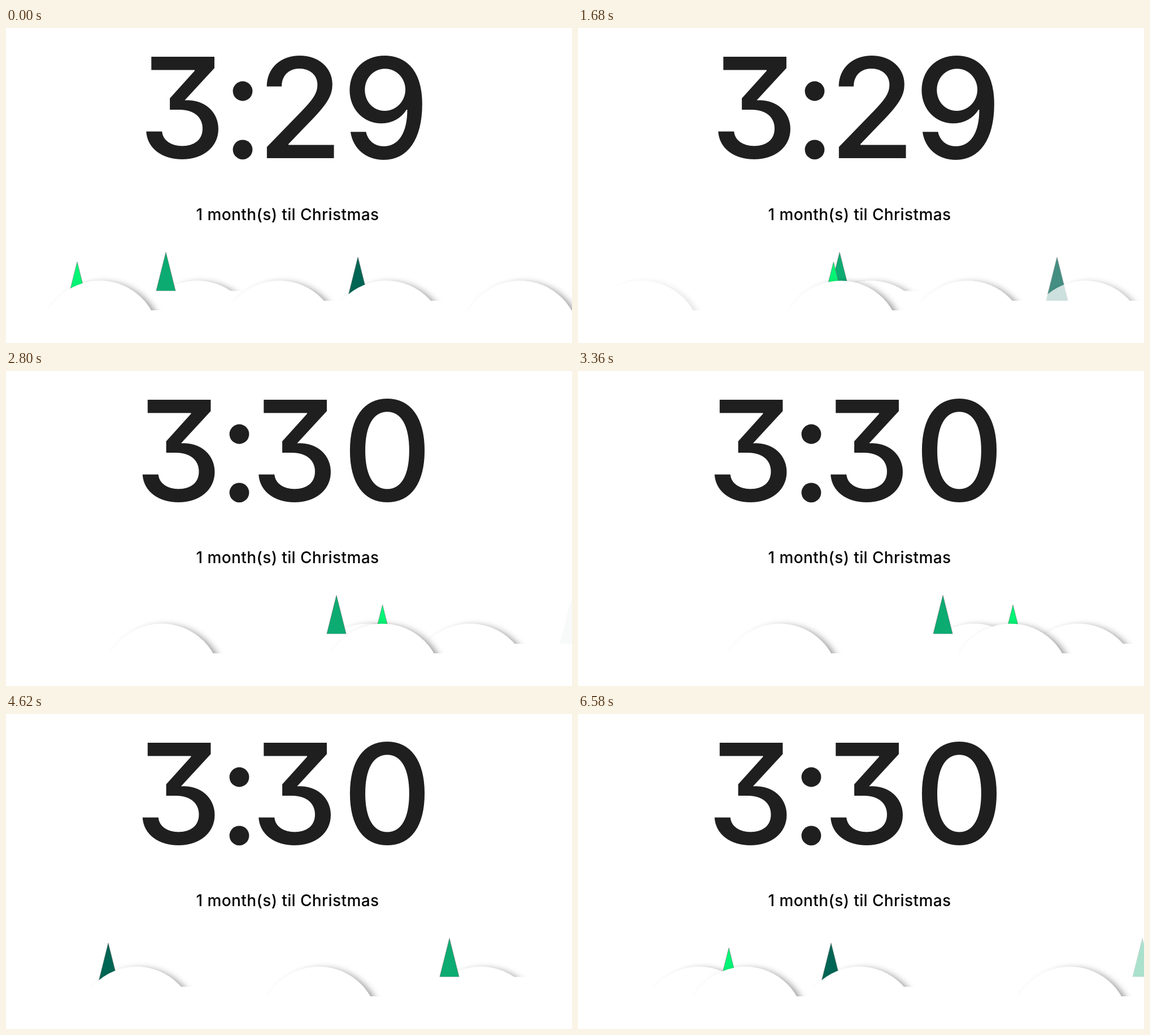
An HTML page that plays this animation: 1002 by 559 pixels, repeating every 6710 ms.

```html
<!DOCTYPE html>
<html lang="en">
<head>
<meta charset="utf-8">
<title>Christmas clock</title>
<style>
  html, body { margin: 0; width: 100%; height: 100%; overflow: hidden; background: #fff; }
  svg { display: block; width: 100%; height: 100%; }
  text {
    font-family: Inter, "Open Sans", sans-serif;
    font-variation-settings: "opsz" 14;
    text-anchor: middle;
  }
  #clock { fill: #1e1f1e; font-size: 247px; font-weight: 460; font-feature-settings: "cv09"; }
  #note { font-size: 28px; font-weight: 500; letter-spacing: .4px; }
</style>
</head>
<body>
<svg viewBox="0 0 1002 559">
  <defs>
    <filter id="shade" x="-20%" y="-20%" width="140%" height="140%">
      <feDropShadow dx="8" dy="3" stdDeviation="6" flood-color="#000" flood-opacity=".38"/>
    </filter>
  </defs>
  <g id="scene"></g>
  <g id="clock">
    <text y="231"></text><text y="231"></text><text y="231"></text>
    <g id="colon"><circle cy="112" r="17.4"/><circle cy="215.8" r="17.4"/></g>
  </g>
  <text id="note" x="498.5" y="341">1 month(s) til Christmas</text>
</svg>
<script>
const LOOP = 6710, STEP = 140, MINUTE = 2800;
const KEYS = [0, 980, 2240, 3360, 4620, 5600, 6580];
const NEVER = [-2, -1], ALWAYS = [1e5, 2e5];

const el = (tag, attrs, parent) => {
  const node = document.createElementNS("http://www.w3.org/2000/svg", tag);
  for (const k in attrs) node.setAttribute(k, attrs[k]);
  return parent.appendChild(node);
};
const $ = id => document.getElementById(id);
const ramp = (t, [a, b]) => Math.min(1, Math.max(0, (t - a) / (b - a)));

// Linear between key times, extended past both ends.
function along(t, first, xs) {
  let i = 0;
  while (i < xs.length - 2 && t > KEYS[first + i + 1]) i++;
  const a = KEYS[first + i], b = KEYS[first + i + 1];
  return xs[i] + (xs[i + 1] - xs[i]) * (t - a) / (b - a);
}

const movers = [];
function layer(base) {
  const id = "cut" + base;
  const clip = el("clipPath", { id }, document.querySelector("defs"));
  el("rect", { width: 1002, height: base }, clip);
  return el("g", { "clip-path": `url(#${id})` }, $("scene"));
}
function move(node, first, xs, fadeIn = NEVER, fadeOut = ALWAYS, shift = 0) {
  movers.push({ node, first, xs, fadeIn, fadeOut, shift });
}
function hill(parent, ...path) {
  move(el("circle", { cy: 553.5, r: 105, fill: "#fff", filter: "url(#shade)" }, parent), ...path);
}
function tree(parent, top, base, fill, ...path) {
  const w = (base - top) / 4;
  const d = `M0 ${top}L${w} ${base}H${-w}Z`;
  move(el("path", { d, fill, stroke: "#707070", "stroke-width": .6 }, parent), ...path);
}

const back = layer(466.5), mid = layer(484), front = layer(501);

const slow = [0, [283, 387, 524, 646, 785, 889, 999], NEVER, [4750, 7580]];
hill(back, ...slow, 55.5);
tree(back, 398, 466.5, "#0cab72", ...slow);

const leaving = [0, [623, 753, 924], NEVER, [1250, 2840]];
const coming = [4, [181, 310, 448], [3400, 4500], ALWAYS];
for (const path of [leaving, coming]) {
  tree(mid, 406.5, 484, "#006554", ...path);
  hill(mid, ...path, 50);
}
hill(mid, 0, [484, 606, 757, 886], NEVER, [3400, 4900]);
hill(mid, 5, [103, 214], [5250, 6600]);

const out = [3450, 4450], into = [5400, 5800];
tree(front, 415, 501, "#04f576", 0, [126, 314, 563, 770], NEVER, out);
tree(front, 415, 501, "#04f576", 5, [66, 267], into);
hill(front, 0, [910, 1057], NEVER, [300, 1700]);
hill(front, 2, [194, 357, 554, 711, 871], [1500, 2100]);
hill(front, 0, [166, 338, 567, 766], NEVER, out);
hill(front, 5, [110, 296], into);

const digits = document.querySelectorAll("#clock text");
function setClock(time, xs, colonX) {
  digits.forEach((d, i) => {
    d.textContent = time[i];
    d.setAttribute("x", xs[i]);
  });
  $("colon").setAttribute("transform", `translate(${colonX})`);
}

function draw(t) {
  for (const m of movers) {
    const x = along(t, m.first, m.xs) + m.shift;
    m.node.setAttribute("transform", `translate(${x.toFixed(2)})`);
    m.node.setAttribute("opacity", ramp(t, m.fadeIn) * (1 - ramp(t, m.fadeOut)));
  }
  if (t < MINUTE) setClock("329", [312, 520.5, 672.5], 419);
  else setClock("330", [305.5, 511, 675], 413);
}

const start = performance.now();
function tick() {
  const t = (performance.now() - start) % LOOP;
  draw(Math.floor(t / STEP) * STEP);
  requestAnimationFrame(tick);
}
tick();
</script>
</body>
</html>
```
